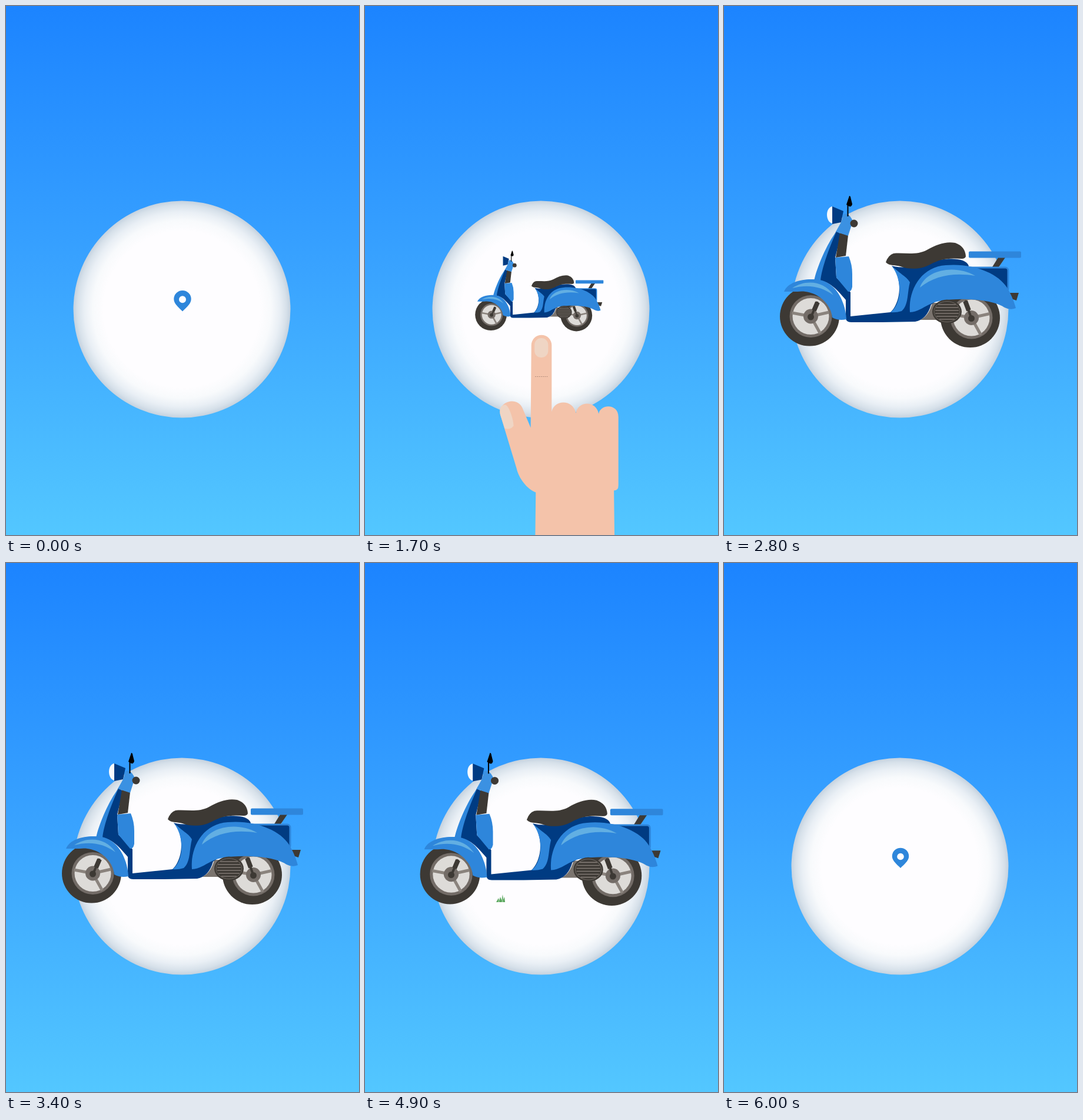
An HTML page that plays this animation: 600 px wide and 900 px high, repeating every 6100 ms.

```html
<!DOCTYPE html>
<html lang="en">
<head>
<meta charset="utf-8">
<title>Scooter call</title>
<style>
  html, body { margin: 0; width: 100%; height: 100%; overflow: hidden; }
  svg { display: block; width: 600px; height: 900px; }
  .navy { fill: #003b82; }
  .blue { fill: #2e86db; }
  .sky { fill: #62afe3; }
  .dark { fill: #3d3934; }
  .skin { fill: #f4c3aa; }
  .nail { fill: #efd5c4; }
</style>
</head>
<body>
<svg viewBox="0 0 600 900">
  <defs>
    <linearGradient id="air" x2="0" y2="1">
      <stop stop-color="#1c84ff"/>
      <stop offset=".5" stop-color="#39a3ff"/>
      <stop offset="1" stop-color="#53c7ff"/>
    </linearGradient>
    <radialGradient id="disc">
      <stop offset=".72" stop-color="#fefdff"/>
      <stop offset=".82" stop-color="#f8fafc"/>
      <stop offset=".9" stop-color="#e9eff5"/>
      <stop offset=".96" stop-color="#d7e1ea"/>
      <stop offset="1" stop-color="#c5d2df"/>
    </radialGradient>
    <g id="wheel">
      <circle r="50.5" class="dark"/>
      <circle cx="2" r="36" fill="#736c67"/>
      <circle cx="2" r="31" fill="#dddbd8"/>
      <path d="M2 0L-30-6M2 0L18 29M2 0L33-7" stroke="#8a837d" stroke-width="5"/>
      <circle cx="2" r="12.5" fill="#736c67"/>
      <circle cx="2" cy="1" r="5.5" class="dark"/>
    </g>
  </defs>

  <rect width="600" height="900" fill="url(#air)"/>
  <circle cx="299" cy="516" r="184.5" fill="url(#disc)"/>

  <g id="pin">
    <path class="blue" fill-rule="evenodd" d="M300 519.5C295 514 285.3 507 285.3 498.7A14.7 14.7 0 0 1 314.7 498.7C314.7 507 305 514 300 519.5ZM294 499.3a6 6 0 0 0 12 0a6 6 0 0 0-12 0Z"/>
  </g>

  <g id="grass">
    <path fill="#57a45c" d="M-8 0L-4-7L-3-2L-1-9L1-3L3-13L4-4L6-9L7 0Z"/>
    <path fill="#8cc78c" d="M-5 0L-4-5L-2 0ZM1 0L3-9L4 0Z"/>
  </g>

  <g id="scooter">
    <use href="#wheel" x="145.5" y="528"/>
    <use href="#wheel" x="418.5" y="530.5"/>
    <path d="M148 529L159 503M420 530L410 501" stroke="#3d3934" stroke-width="4"/>
    <path d="M153 518L159 504M416 518L410 502" stroke="#3d3934" stroke-width="8"/>

    <path class="dark" d="M466 428H478L467 444H456Z"/>
    <rect class="blue" x="416" y="417.5" width="89" height="11" rx="2"/>
    <path class="dark" d="M481 488H501L497 501L488 498Z"/>

    <path fill="#7b746e" d="M333 534Q348 528 354 505L385 505V534Z"/>
    <path class="navy" d="M285 442C300 447 340 445 365 432C390 428 412 430 416 442L400 475L352 508Q345 533 325 537L270 538H216Q207 538 207 530V500C190 480 180 470 163 467C165 445 180 400 191 383L199 388L189 428L191 462L215 487V528L283 521C300 505 305 465 285 442Z"/>
    <rect class="navy" x="400" y="445" width="83" height="41" rx="5" stroke="#2e86db" stroke-width="3"/>
    <path class="blue" d="M285 442C301 457 310 460 316 470C311 490 314 508 302 519Q292 522 283 521C302 507 304 466 285 442Z"/>
    <path class="blue" d="M316 521C313 484 334 444 377 441C424 437 466 455 481 479Q491 495 496 514Q487 518 477 513C455 498 400 496 366 502C342 507 335 520 316 521Z"/>
    <path class="sky" d="M333 479C343 449 392 439 427 459C392 453 358 458 333 479Z"/>
    <path class="dark" d="M275 436Q279 424 288 421C305 419 327 425 345 415C362 405 378 400 393 403Q410 409 411 426Q410 430 404 430C380 428 366 431 350 440C335 448 315 449 300 443C291 440 282 443 275 436Z"/>

    <ellipse cx="379" cy="520" rx="25" ry="20.5" class="dark"/>
    <ellipse cx="379" cy="520" rx="22" ry="17.5" fill="none" stroke="#6f6963"/>
    <path d="M364 508H394M360 513H398M359 518H399M359 523H399M361 528H397M366 533H392" stroke="#817a74" stroke-width="1.6"/>

    <path class="blue" d="M191 384C176 402 157 446 153 468L164 468C166 445 180 409 191 384Z"/>
    <path class="blue" d="M102 486C108 470 132 464 152 465C186 464 206 498 208 533Q195 536 184 530C181 501 151 482 125 486Z"/>
    <path class="sky" d="M116 480C138 465 170 467 186 492C166 477 143 473 116 480Z"/>
    <path class="dark" d="M197 386L211 390L207 425L190 428Z"/>
    <path class="blue" d="M189 428L212 426Q218 440 218 456V478Q216 487 211 486L191 462Z"/>

    <path d="M184 341C172 343 172 367 184 370Z" fill="#f8fafd"/>
    <path class="navy" d="M184 341L203 349L199 368L184 371Z"/>
    <path fill="#3b91e2" d="M203 354C211 350 217 361 219 366L211 391L190 384L199 368Z"/>
    <circle cx="221" cy="370" r="6.5" class="dark"/>
    <path d="M210.5 358V336" stroke="#000" stroke-width="2"/>
    <path d="M213 323Q215 323 215.500 327L218 337Q217 342 213 341L208 338Z"/>
  </g>

  <g id="hand">
    <path class="skin" d="M284 523A16 16 0 0 1 316 523V628C320 608 350 608 354 630C358 610 386 610 390 631C393 615 421 615 421 636V744Q421 752 414 752L417 1000H288L291 755C277 750 264 732 261 718L235 632C231 612 262 603 270 622L283 653Z"/>
    <rect class="nail" x="289" y="512" width="21.500" height="30.500" rx="10.500"/>
    <path class="nail" d="M235 632C233 620 238 617 243 617C249 618 256 641 256 650Q251 657 242 654Z"/>
    <path d="M290 572.500H311" stroke="#a98473" stroke-dasharray="1.500 1.500"/>
  </g>
</svg>
<script>
const LOOP = 6100, STEP = 100;
const part = id => document.getElementById(id);
const [pin, grass, scooter, hand] = ["pin", "grass", "scooter", "hand"].map(part);

const progress = (t, from, to) => Math.min(1, Math.max(0, (t - from) / (to - from)));
const easeOut = p => 1 - (1 - p) ** 3;
const easeIn = p => p ** 3;
const smooth = p => p * p * (3 - 2 * p);

// Scales a part about (x, y), then shifts it down by dy.
function pose(el, x, y, scale, dy = 0) {
  el.style.display = scale > 0.001 ? "" : "none";
  el.setAttribute("transform", `translate(${x} ${y + dy}) scale(${scale}) translate(${-x} ${-y})`);
}

function draw(t) {
  const press = smooth(progress(t, 800, 1100)) - smooth(progress(t, 1100, 1400));
  const pinScale = t < 3000
    ? 1 - 0.18 * smooth(progress(t, 800, 1100)) - 0.82 * smooth(progress(t, 1200, 1500))
    : easeOut(progress(t, 5600, 6100 + 80));
  pose(pin, 300, 506, pinScale);

  const away = 1 - easeOut(progress(t, 200, 800)) + easeIn(progress(t, 1400, 2000));
  pose(hand, 300, 520, 1.08 - 0.08 * press, 430 * away);

  const grow = easeOut(progress(t, 1400, 2742));
  const shrink = 1 - easeIn(progress(t, 5000, 5600));
  const riding = progress(t, 2800, 2900) * shrink;
  const bob = 0.75 * riding * (1 - Math.cos((t - 2800) / 600 * 2 * Math.PI));
  const swell = 1 + 0.007 * smooth(progress(t, 4000, 4900));
  pose(scooter, 292, 522, grow * shrink * swell, bob);

  const sprout = progress(t, 4550, 4750) * (1 - progress(t, 5400, 5700));
  const x = 231 + 0.335 * (t - 4900);
  const y = 577 - 4 * progress(t, 4900, 5600);
  grass.setAttribute("transform", `translate(${x} ${y}) scale(${sprout})`);
}

const start = performance.now();
function tick() {
  const t = (performance.now() - start) % LOOP;
  draw(Math.floor(t / STEP) * STEP);
  requestAnimationFrame(tick);
}
tick();
</script>
</body>
</html>
```
